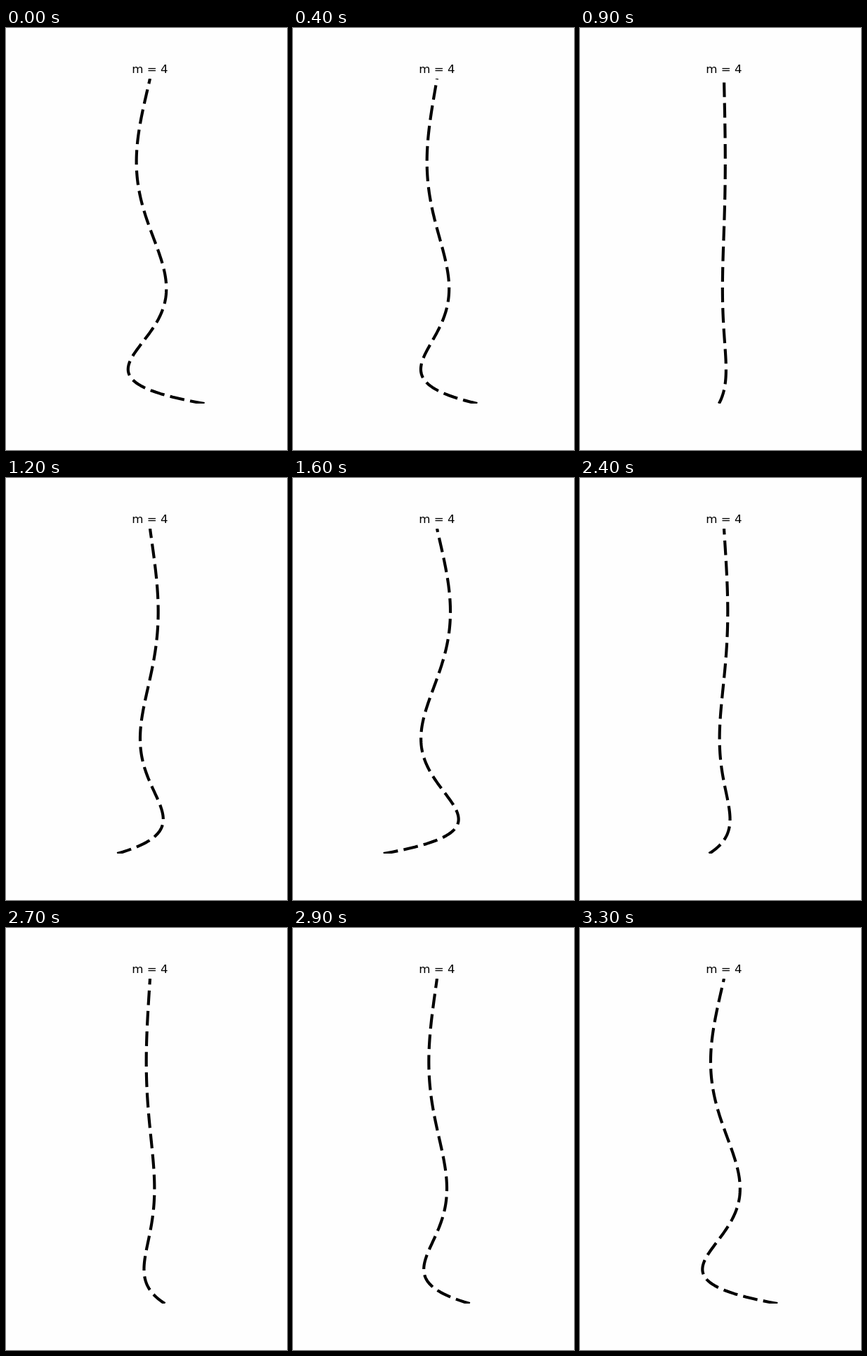
These frames come from a looping animation (400x600 px, 3400 ms). An HTML page:

```html
<!DOCTYPE html>
<html lang="en">
<head>
<meta charset="utf-8">
<title>Hanging chain mode</title>
<style>
  html, body { margin: 0; width: 100%; height: 100%; overflow: hidden; background: #fefefe; }
  svg { display: block; }
  text { font: 16.667px "DejaVu Sans", sans-serif; text-anchor: middle; }
</style>
</head>
<body>
<svg width="400" height="600" viewBox="0 0 400 600">
  <clipPath id="axes"><rect x="50" y="72" width="310" height="462"/></clipPath>
  <text x="205" y="64">m = 4</text>
  <g clip-path="url(#axes)">
    <path id="chain" fill="none" stroke="#000" stroke-width="4.167"
          stroke-linejoin="round" stroke-dasharray="20.833 8.333"/>
  </g>
</svg>
<script>
const STEP = 100, STEPS = 34;
const CENTER = 205, BOTTOM = 534, LENGTH = 462, AMPLITUDE = 77.5;
const ROOT = 11.791534; // fourth zero of J0
const POINTS = 200;
const chain = document.getElementById("chain");

// Bessel function J0 as a periodic mean
function besselJ0(x) {
  const n = 48;
  let sum = 0;
  for (let k = 0; k < n; k++) sum += Math.cos(x * Math.sin(2 * Math.PI * k / n));
  return sum / n;
}

// Mode shape from the free end (z = 0) up to the support (z = 1)
const shape = Array.from({ length: POINTS + 1 }, (_, i) => {
  const z = i / POINTS;
  return { y: BOTTOM - LENGTH * z, u: besselJ0(ROOT * Math.sqrt(z)) };
});

function draw(time) {
  const step = Math.floor(time / STEP) % STEPS;
  const swing = AMPLITUDE * Math.cos(2 * Math.PI * step / STEPS);
  const points = shape.map(({ y, u }) => `${(CENTER + swing * u).toFixed(3)},${y.toFixed(3)}`);
  chain.setAttribute("d", "M" + points.join("L"));
}

const start = performance.now();
function tick() {
  draw(performance.now() - start);
  requestAnimationFrame(tick);
}
tick();
</script>
</body>
</html>
```
